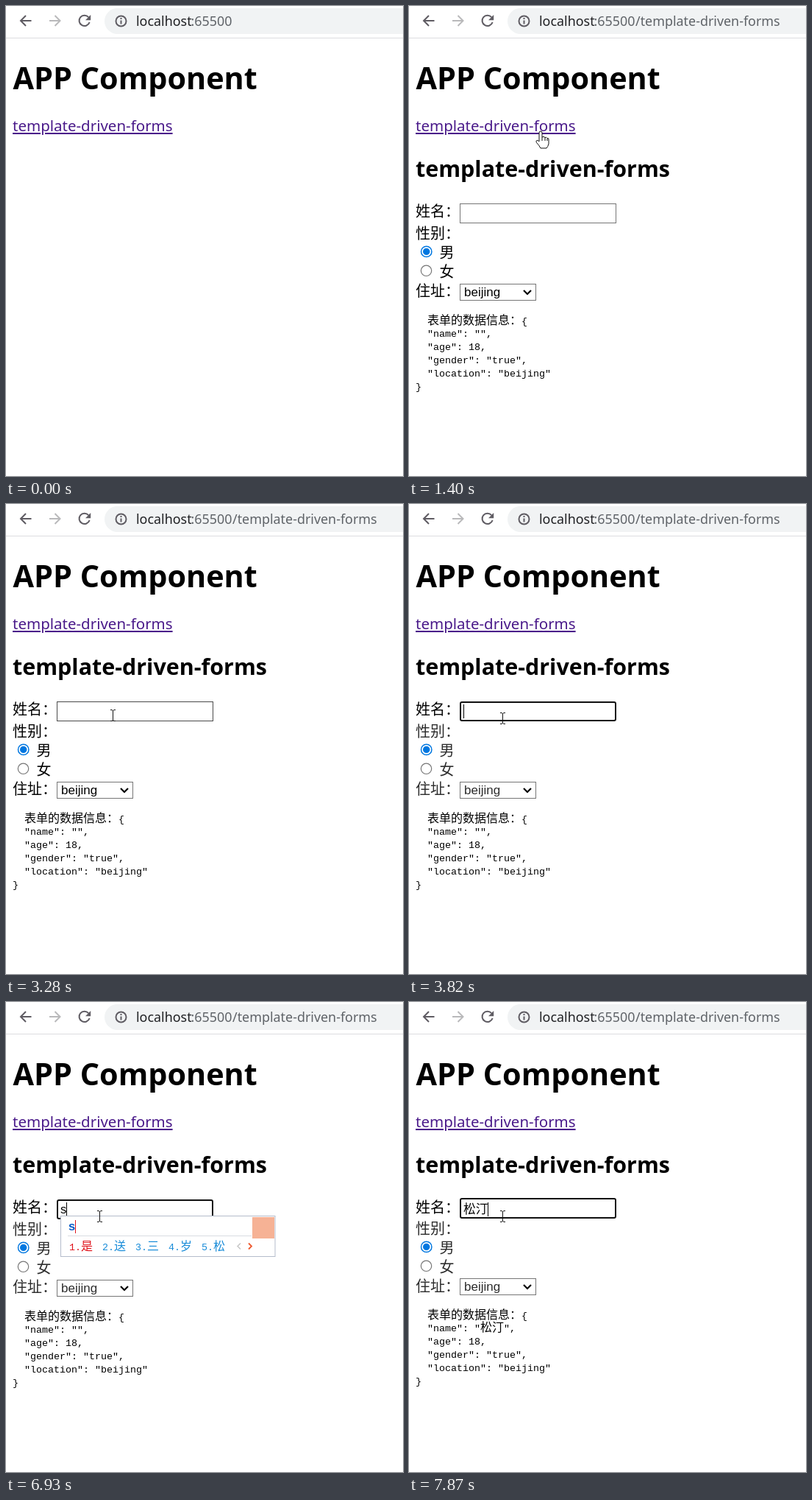
Animation, 540 px wide and 638 px high, one loop 8 s. Source, as an HTML page:

```html
<!DOCTYPE html>
<html lang="zh-CN">
<head>
<meta charset="utf-8">
<title>template-driven-forms</title>
<style>
html, body { margin: 0; width: 100%; height: 100%; overflow: hidden; background: #fff; }
svg { display: block; width: 540px; height: 638px; }
text { white-space: pre; font-family: "Noto Sans", "Open Sans", "Noto Sans CJK SC", "Noto Sans CJK", sans-serif; }
.label { font: 350 20px "Noto Sans CJK SC", "Noto Sans CJK", sans-serif; }
.field { font: 16.67px "Liberation Sans", "Noto Sans CJK SC", "Noto Sans CJK", sans-serif; }
.mono { font: 13.33px "Liberation Mono", monospace; }
.cjk { font: 350 16px "Noto Sans CJK SC", "Noto Sans CJK", sans-serif; }
.small { font: 12px "Liberation Sans", sans-serif; }
.typed { font: bold 16.5px "Liberation Sans", sans-serif; fill: #0a5cc8; }
.icon { fill: none; stroke: #5f5c63; stroke-width: 2; }
</style>
</head>
<body>
<svg viewBox="0 0 540 638">
  <!-- toolbar -->
  <path d="M540 3H151.500a17.500 17.500 0 0 0 0 35H540Z" fill="#f1f3f4"/>
  <path d="M0 43.500H540" stroke="#dcdde0"/>
  <path class="icon" d="M34.500 20H20M27 13L20 20L27 27"/>
  <path class="icon" d="M59 20H73.500M66.500 13L73.500 20L66.500 27" style="stroke:#b9b9bb"/>
  <path class="icon" d="M112.200 15.200A7.200 7.200 0 1 0 113.600 22"/>
  <path d="M115.200 12V19.200H108Z" fill="#5f5c63"/>
  <circle class="icon" cx="156.500" cy="20.500" r="7"/>
  <path class="icon" d="M156.500 16V18M156.500 19.500V24.500"/>
  <text y="26.500" font-size="17.900" fill="#5f6368"><tspan x="177" fill="#202124">localhost</tspan><tspan x="251.500">:65500</tspan><tspan id="route" x="308">/template-driven-forms</tspan></text>

  <text x="9.500" y="112.500" font-size="41.350" font-weight="700">APP Component</text>
  <text x="9" y="170" font-size="20.500" fill="#4a1a8a" text-decoration="underline">template-driven-forms</text>

  <g id="page">
    <text x="9" y="231.500" font-size="30.450" font-weight="700">template-driven-forms</text>
    <text class="label" x="9" y="286">姓名：</text>
    <rect id="box" fill="#fff"/>
    <text id="value" class="field" x="74" y="286.500"></text>
    <path id="caret" stroke="#000"/>
    <g id="rows">
      <text class="label" x="9" y="316">性别：</text>
      <circle cx="23.700" cy="333.400" r="7.200" fill="#fff" stroke="#0077e0" stroke-width="1.500"/>
      <circle cx="23.700" cy="333.400" r="4.700" fill="#0077e0"/>
      <text class="label" x="41.500" y="342">男</text>
      <circle cx="23.500" cy="359.300" r="7.200" fill="#fff" stroke="#767676" stroke-width="1.200"/>
      <text class="label" x="41.500" y="368">女</text>
      <text class="label" x="9" y="394">住址：</text>
    </g>
    <g id="select">
      <rect x="69.500" y="377.500" width="103" height="22" fill="#fff" stroke="#767676"/>
      <text class="field" x="75" y="394" style="font-size:17px">beijing</text>
      <path d="M156 386L161 391L166 386" fill="none" stroke="#000" stroke-width="2.200"/>
    </g>
    <g id="json"></g>
  </g>

  <g id="ime">
    <rect id="panel" x="74.500" y="290.500" height="55" fill="#fff" stroke="#b4bccb"/>
    <path id="rule" stroke="#d9dce2"/>
    <text id="typed" class="typed" x="85" y="310"></text>
    <path id="typedCaret"/>
    <g id="words"></g>
    <path id="prev" d="M4.500 -4L0.500 0L4.500 4" fill="none" stroke="#c4c4c4" stroke-width="1.400"/>
    <path id="next" d="M0 -4L4 0L0 4" fill="none" stroke="#ee5a30" stroke-width="1.800"/>
    <rect id="badge" y="292" width="30" height="29" fill="#f6b295"/>
  </g>

  <g id="cursor">
    <path id="arrow" d="M0 0V17L4 13.500L6.500 19.500L9 18.500L6.500 12.500H12Z" fill="#fff" stroke="#000"/>
    <path id="hand" d="M-2 13V2Q-2 0 0 0T2 2V8Q4 6.500 6 8.500Q8 7.500 9 9.500Q11 9 11 11V17Q10 21 8 23H0Q-2 19 -5.500 15.500Q-7 13 -5 12.500Q-3.500 12 -2 14ZM2 8V13M6 9V13M9 10V13" fill="#fff" stroke="#111"/>
    <path id="beam" d="M-3 -7.500H-1L0.500 -6.500L2 -7.500H4M0.500 -6.500V6.500M-3 7.500H-1L0.500 6.500L2 7.500H4" fill="none" stroke="#111"/>
  </g>
</svg>
<script>
const LOOP = 8000, LOADED = 1320, HOVER = 1860, FOCUS = 3820, COMPOSE = 6930, COMMIT = 7870;
const NAME = '松汀';
const $ = id => document.getElementById(id);
const set = (el, attrs) => { for (const k in attrs) el.setAttribute(k, attrs[k]); return el; };
const make = (tag, attrs, parent) =>
  parent.appendChild(set(document.createElementNS('http://www.w3.org/2000/svg', tag), attrs));
const show = (id, on) => { $(id).style.visibility = on ? 'visible' : 'hidden'; };

// Pointer strokes: first step, last step, number of steps, shape, way points.
const strokes = [
  [230, 782, 8, 'arrow', [[235, 545], [207, 420], [168, 310], [142, 240], [138, 195]]],
  [861, 940, 2, 'hand', [[160, 174], [179, 169.5]]],
  [1630, 1783, 3, 'arrow', [[177, 195], [166, 262]]],
  [1860, 1860, 1, 'beam', [[163, 294], [163, 294]]],
  [2020, 2260, 4, 'beam', [[162, 292], [158, 286]]],
  [3050, 3740, 10, 'beam', [[156, 286], [140, 287], [127, 291]]]
];

// Time, field text, typed text, candidates (* adds the contact icon).
const compositions = [
  [6930, 's', 's', ['是', '送', '三', '岁', '松']],
  [7000, 'so', 'so', ['搜', '艘', '嗽', '叟', '擞']],
  [7080, 'son', 'son', ['松', '送你', '送', '颂你', '松年']],
  [7240, 'song', 'song', ['松', '送', '颂', '耸', '诵']],
  [7480, 'songt', "song't", ['松塔*', '耸(shong)塔', '松', '送', 'songting']],
  [7560, 'songt', "song'ti", ['松提*', '耸(shong)提', '松', '送', 'songting']],
  [7650, 'songtin', "song'tin", ['松汀', '松亭', '送停', '松庭', '松']],
  [7710, 'songting', "song'ting", ['松汀', '松亭', '送停', '松庭', '松']]
];
const blinks = [4300, 4820, 5370, 5840, 6390];

// Writes mixed text on an 8 px / 16 px grid and returns its end.
function write(parent, str, x, y, fill) {
  for (const run of str.match(/\([a-z]+\)|[\u2000-\uffff]+|[ -'*-~]+/g)) {
    const kind = run[0] === '(' ? 'small' : run > '\u2000' ? 'cjk' : 'mono';
    make('text', { x, y, fill, class: kind }, parent).textContent = run;
    x += run.length * { small: 6.4, cjk: 16, mono: 8 }[kind];
  }
  return x;
}

function drawJson(name) {
  $('json').replaceChildren();
  ['  表单的数据信息：{', `  "name": "${name}",`, '  "age": 18,', '  "gender": "true",',
    '  "location": "beijing"', '}'].forEach((line, i) =>
    write($('json'), line, 9, (i ? 431 : 432) + i * 18, '#000'));
}

function drawIme([, , typed, words]) {
  const group = $('words');
  group.replaceChildren();
  let x = 86;
  words.forEach((word, i) => {
    const fill = i ? '#178bd8' : '#e0141c';
    x = write(group, `${i + 1}.${word.replace('*', '')}`, x, 337, fill);
    if (word.endsWith('*')) {
      make('path', { d: `M${x - 1} 332q0 -4 4 -4t4 4z`, fill }, group);
      make('circle', { cx: x + 3, cy: 326, r: 2.3, fill }, group);
      x += 8;
    }
    x += 13;
  });
  const end = x - 13, right = end + 68;
  set($('panel'), { width: right - 74.5 });
  set($('rule'), { d: `M84 317.5H${right - 32}` });
  set($('badge'), { x: right - 31 });
  set($('prev'), { transform: `translate(${end + 16.5} 331.5)` });
  set($('next'), { transform: `translate(${end + 32} 331.5)` });
  $('typed').textContent = typed;
  const cx = Math.round(85 + $('typed').getComputedTextLength()) + 0.5;
  set($('typedCaret'), { d: `M${cx} 296V314`, stroke: typed.length > 1 ? '#46506a' : '#e0141c' });
}

function drawCursor(t) {
  const stroke = strokes.findLast(s => t >= s[0]);
  for (const id of ['arrow', 'hand', 'beam']) show(id, stroke && stroke[3] === id);
  if (!stroke) return;
  const [start, end, steps, , points] = stroke;
  const step = end > start ? Math.min(steps - 1, Math.floor((t - start) / (end - start) * (steps - 1) + 1e-6)) : 0;
  const u = steps > 1 ? step / (steps - 1) * (points.length - 1) : 0;
  const i = Math.min(points.length - 2, Math.floor(u));
  const [x, y] = [0, 1].map(k => points[i][k] + (points[i + 1][k] - points[i][k]) * (u - i));
  set($('cursor'), { transform: `translate(${Math.round(x)} ${Math.round(y)})` });
}

function drawField(t, text) {
  const focused = t >= FOCUS, done = t >= COMMIT;
  set($('box'), focused
    ? { x: 70, y: done ? 267 : 269, width: 211, height: done ? 26 : 25, rx: 2, stroke: '#101010', 'stroke-width': 2 }
    : { x: 69.5, y: 268.5, width: 212, height: 26, rx: 0, stroke: t >= HOVER ? '#4a4a4a' : '#767676', 'stroke-width': 1 });
  for (const id of ['rows', 'select']) set($(id), { fill: focused ? '#2c2c2c' : '#000' });
  $('value').textContent = text;
  const x = Math.round(74 + (text ? $('value').getComputedTextLength() : 0)) + 0.5;
  set($('caret'), { d: `M${x} 272V291` });
  const blinkedOff = blinks.filter(b => t >= b).length % 2 === 1;
  show('caret', focused && (t >= COMPOSE || !blinkedOff));
}

let lastState;
function draw(t) {
  const done = t >= COMMIT, loaded = t >= LOADED;
  const current = done ? undefined : compositions.findLast(c => t >= c[0]);
  const text = done ? NAME : current ? current[1] : '';
  $('page').style.display = loaded ? '' : 'none';
  $('route').style.display = loaded ? '' : 'none';
  $('ime').style.display = current ? '' : 'none';
  const state = done ? 'done' : current || 'empty';
  if (state !== lastState) {
    lastState = state;
    drawJson(done ? NAME : '');
    set($('rows'), { transform: `translate(0 ${done ? -1 : 0})` });
    for (const id of ['select', 'json']) set($(id), { transform: `translate(0 ${done ? -2 : 0})` });
    if (current) drawIme(current);
  }
  drawField(t, text);
  drawCursor(t);
}

const origin = performance.now();
function tick() {
  draw((performance.now() - origin) % LOOP);
  requestAnimationFrame(tick);
}
tick();
</script>
</body>
</html>
```
